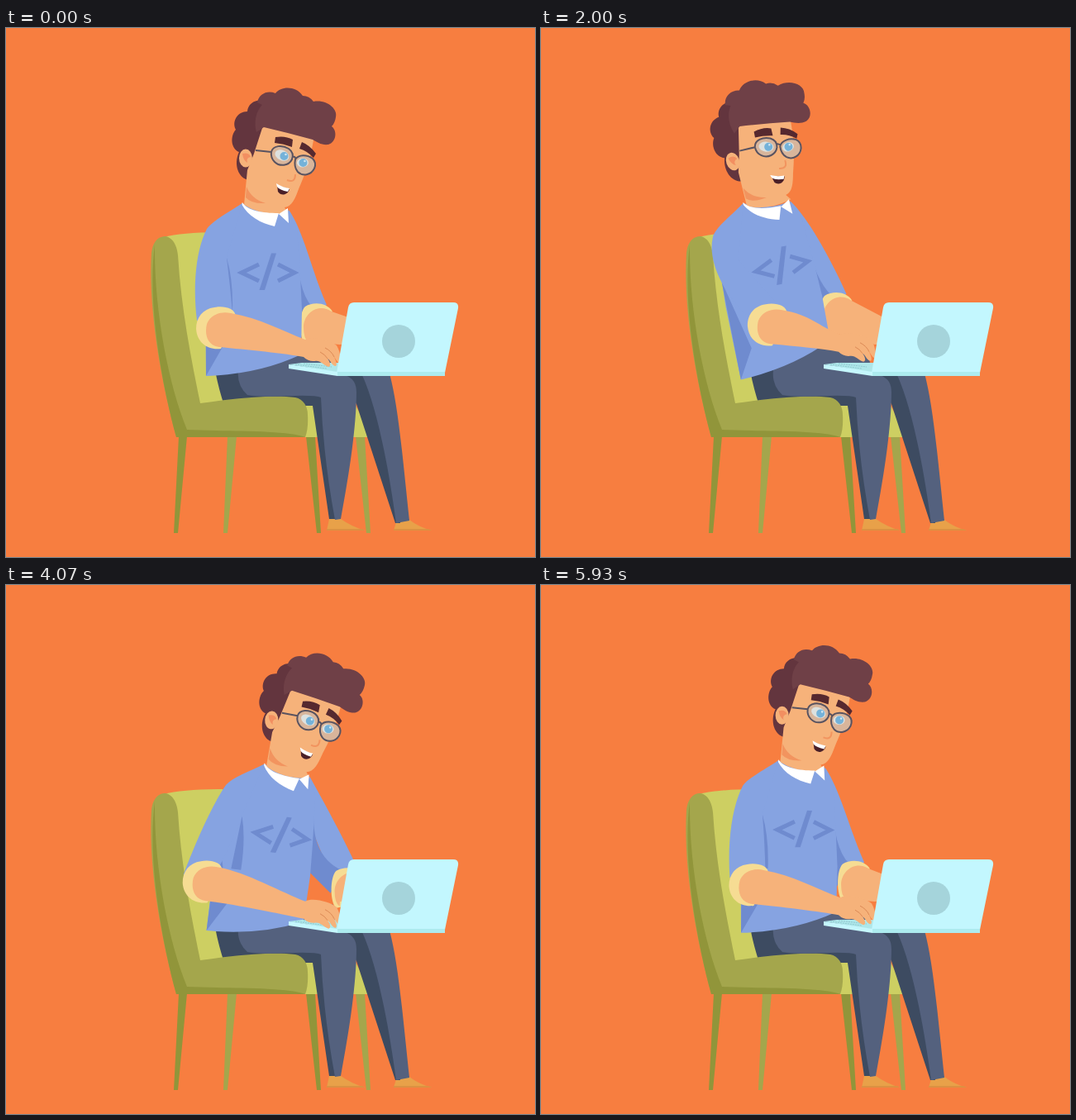
Write an HTML page that moves like this. It is 640 by 640 pixels and loops after 6000 ms.

```html
<!DOCTYPE html>
<html lang="en">
<head>
<meta charset="utf-8">
<title>Coder at a laptop</title>
<style>
html, body { margin: 0; width: 100%; height: 100%; overflow: hidden; background: #f77e40; }
svg { display: block; width: 100vw; height: 100vh; }
.skin { fill: #f6b27a; }
.blue { fill: #86a3e1; }
.shade { fill: #6f8bcf; }
.cuff { fill: #f6dc93; }
.olive { fill: #a4a64c; }
.moss { fill: #91953a; }
.lime { fill: #cdcf62; }
.navy { fill: #3d4b61; }
.slate { fill: #54617e; }
.white { fill: #fff; }
.line { fill: none; }
</style>
</head>
<body>
<svg viewBox="0 0 640 640">
  <!-- chair, legs and shoes -->
  <path class="olive" d="M268 494H279L268 611H263ZM423 494H434L441 611H436Z"/>
  <path class="moss" d="M209 494H219L208 611H203ZM363 494H374L381 611H376Z"/>
  <path class="lime" d="M190 253Q215 247 262 247L300 300V456H234ZM355 455H422Q433 474 438 495H355Z"/>
  <path fill="#e8a149" d="M391 594H405Q418 603 434 608H388ZM472 598L488 595Q500 604 515 608H469Z"/>
  <path fill="#dc9142" d="M388 606H431L434 608H388ZM469 606H511L515 608H469Z"/>
  <path class="navy" d="M405 418H440L477 599H471L424 455Z"/>
  <path class="slate" d="M430 418H464C474 455 479 510 488 596L472 599C464 540 450 460 430 418Z"/>
  <path class="navy" d="M254 419L300 408L384 446L400 594H391L371 457H264Q257 435 254 419Z"/>
  <path class="olive" d="M176 272C178 256 186 252 193 252C203 254 207 265 208 275C212 340 224 400 235 454C270 449 320 443 350 447C360 449 365 458 365 468Q366 485 362 495H206C187 425 172 340 176 272Z"/>
  <path class="moss" d="M180 262C179 340 196 430 219 486C260 488 340 486 362 495H206C187 425 171 330 180 262Z"/>
  <path class="slate" d="M281 414C295 406 315 390 335 386H395L400 418Q424 420 424 440C424 485 414 545 405 594L398 595Q384 520 381 447Q375 444 345 445Q310 447 292 444Q279 432 281 414Z"/>

  <!-- far arm -->
  <path class="blue" data-d="M t342,220 C t360,245 f370,295 f388,335 L f358,350 L t340,260 Z"/>
  <path class="shade" data-d="M t352,243 Q t350,315 f370,337 L f355,364 L t350,330 Z"/>
  <path class="cuff" data-d="M f395,343 C f388,332 f372,331 f362,337 C f354,344 f354,376 f362,382 L f372,380 L f375,345 Z"/>
  <path class="skin" data-d="M f394,343 C f378,332 f360,345 f360,362 Q f360,376 f366,380 L 404,383 L 414,382 L 414,350 Z"/>

  <g class="torso">
    <path class="blue" d="M286 212L245 243L241 330L242 421Q306 419 357 395L358 340L356 300L352 243Q350 235 341 220Q318 228 286 212Z"/>
    <path class="shade" d="M242 300L262 386L242 421ZM267 278Q275 305 274 343L262 343Z"/>
    <path class="line" d="M306 286L285 296L306 306M329 286L349 296L329 306" stroke="#6f8bcf" stroke-width="5"/>
    <path class="shade" d="M321 272.500H327L313 317H306.500Z"/>
  </g>

  <g id="head">
    <path fill="#63353e" d="M318 90C305 84 293 90 292 101C280 101 273 113 278 123C271 131 272 146 282 150C275 165 281 182 294 184L304 150L320 122Z"/>
    <path class="skin" d="M312 115L300 152L292 172L288 214Q310 228 341 224L337 217C346 216 350 206 354 195C361 179 368 162 373 130Z"/>
    <path fill="#f2945f" d="M291 192Q297 207 314 212Q297 213 290 205Z"/>
    <ellipse class="skin" cx="290" cy="157.500" rx="8" ry="11"/>
    <path fill="#f28f61" d="M286 152Q294 150 296 156Q290 157 292 163Q287 160 286 152Z"/>
    <path fill="#6f4047" d="M303 126C299 110 305 98 310 93L304 90C306 80 316 75 326 79C333 70 351 70 359 82Q367 82 372 89C388 86 402 98 399 108Q398 115 394 119C401 124 400 138 390 141C382 142 376 138 371 135Q342 127 312 120Z"/>
    <path fill="#56292f" d="M326 132Q338 130 347 135L346 144Q336 140 325 139ZM355 146L358 138Q368 142 375 152L372 157Q365 149 355 146Z"/>
    <g fill="#d8b59b">
      <ellipse cx="334" cy="154.500" rx="13" ry="11.500" transform="rotate(20 334 154.500)"/>
      <ellipse cx="362" cy="166" rx="12.500" ry="11.500" transform="rotate(20 362 166)"/>
    </g>
    <g fill="#dde1df">
      <ellipse cx="334" cy="154" rx="9" ry="6" transform="rotate(25 334 154)"/>
      <ellipse cx="359" cy="163" rx="7" ry="5.500"/>
    </g>
    <g fill="#74b2d9"><circle cx="336.500" cy="155" r="5"/><circle cx="359.500" cy="163" r="5"/></g>
    <g fill="#cfe6f2"><circle cx="338.500" cy="153" r="1.300"/><circle cx="361.500" cy="161" r="1.300"/></g>
    <path class="line" stroke="#595360" stroke-width="2" d="M321 150C323 142 334 141 342 146Q349 151 346 159C342 167 331 168 325 162Q320 157 321 150ZM350 159C354 153 364 153 371 158Q376 163 373 170C369 178 359 180 353 174Q348 168 350 159ZM346 155Q349 155 351 158M302 148L321 150"/>
    <path class="line" d="M350 177Q350 188 340 184" stroke="#f2945f" stroke-width="2"/>
    <path fill="#4a2028" d="M328 190L343 195C341 202 333 204 329 198Z"/>
    <path class="white" d="M327 188Q335 193 343 194L341 198Q331 196 328 192Z"/>
  </g>

  <path class="torso white" d="M286 211C292 221 310 224 330 224L325 240C308 236 293 228 285 213ZM330 225L341 218L342 236Z"/>

  <!-- laptop base -->
  <path fill="#aee7ea" d="M342 407L358 405H404L401 417Z"/>
  <path fill="#c5f7fd" d="M342 407L401 416V421L342 412Z"/>
  <path class="line" d="M350 407L388 412M360 406L394 410" stroke="#8fc9d0" stroke-dasharray="2 1"/>

  <!-- near arm -->
  <path class="blue" data-d="M t286,212 C t268,224 t250,233 t243,243 C t229,270 m226,315 e231,354 L e255,362 L e274,345 Q m271,310 t267,278 Z"/>
  <path class="cuff" data-d="M e278,350 C e278,338 e262,336 e252,338 C e238,340 e230,350 e230,364 C e231,380 e243,390 e260,388 Z"/>
  <path class="skin" data-d="M e272,345 C e307,351 h335,367 h362,377 C h372,372 h392,378 h400,384 C h404,391 h406,400 h404,405 C h401,406 h399,400 h397,398 C h400,404 h401,409 h398,409 C h394,408 h392,401 h389,400 C h392,404 h394,409 h390,410 C h384,408 h380,402 h374,403 Q h366,404 h360,398 C h340,394 e290,389 e258,386 C e243,384 e240,370 e243,358 C e247,347 e260,342 e272,345 Z"/>
  <path class="line" stroke="#dc8a56" data-d="M h386,387 Q h394,391 h397,398 M h380,392 Q h386,395 h389,400"/>

  <!-- laptop screen -->
  <path fill="#c3f7fe" d="M421 332H541Q548 332 547 339L531 417H400L414 338Q415 332 421 332Z"/>
  <path fill="#adebef" d="M401 416H531V421H401Z"/>
  <circle cx="475" cy="379" r="20" fill="#a5d4db"/>
</svg>
<script>
const LOOP = 6000, SWING = LOOP / 4;
const HIP = [265, 424], NECK = [305, 205], SHOULDER = [250, 262], UPPER_ARM = 103;

// Key points of the torso's lean: time in ms, degrees
const leans = [[0, 0], [790, -6.5], [2000, -11.1], [3000, -11.2], [3570, -1.6], [4150, 8], [4710, 5.3]];

const leanKey = i => {
  const n = leans.length, lap = Math.floor(i / n), [t, deg] = leans[i - lap * n];
  return [t + lap * LOOP, deg];
};

// Smooth cyclic curve through the key points
function leanAt(t) {
  const i = leans.findLastIndex(k => k[0] <= t);
  const [a, b, c, d] = [-1, 0, 1, 2].map(o => leanKey(i + o));
  const span = c[0] - b[0], u = (t - b[0]) / span;
  const slope = (p, q) => (q[1] - p[1]) / (q[0] - p[0]) * span;
  const ease = u * u * (3 - 2 * u);
  return b[1] + (c[1] - b[1]) * ease
    + slope(a, c) * u * (1 - u) ** 2 - slope(b, d) * u * u * (1 - u);
}

const rad = deg => deg * Math.PI / 180;

function turn(x, y, deg) {
  const c = Math.cos(rad(deg)), s = Math.sin(rad(deg)), dx = x - HIP[0], dy = y - HIP[1];
  return [HIP[0] + dx * c - dy * s, HIP[1] + dx * s + dy * c];
}

const torsoParts = document.querySelectorAll('.torso');
const head = document.getElementById('head');
const limbs = [...document.querySelectorAll('[data-d]')];

function draw(t) {
  const lean = leanAt(t), swing = 4 * Math.sin(2 * Math.PI * t / SWING);
  const nod = Math.min(0.6 * lean, 1.75 * lean);
  const arm = rad(swing - 2.35 * lean);

  const [sx, sy] = turn(...SHOULDER, lean);
  const ex = sx + UPPER_ARM * Math.sin(arm) - SHOULDER[0];
  const ey = (sy + UPPER_ARM * (Math.cos(arm) - 1) - SHOULDER[1]) / 2;
  const handY = lean / 4 - swing;
  const farX = Math.max(4.5 * lean, 1.3 * lean) - 1.2 * swing;

  // Path points are tagged by the part they follow:
  // torso, elbow, hand, far elbow, or midway along the near sleeve
  const follow = {
    t: (x, y) => turn(x, y, lean),
    e: (x, y) => [x + ex, y + ey],
    h: (x, y) => [x, y + handY],
    f: (x, y) => [x + farX, y + 1.2 * lean],
    m: (x, y) => {
      const [tx, ty] = turn(x, y, lean);
      return [tx * 0.65 + (x + ex) * 0.35, ty * 0.65 + (y + ey) * 0.35];
    }
  };
  for (const el of limbs) {
    el.setAttribute('d', el.dataset.d.replace(/([tehfm])(\d+),(\d+)/g,
      (_, part, x, y) => follow[part](+x, +y).map(n => n.toFixed(2)).join()));
  }
  const tilt = `rotate(${lean} ${HIP})`;
  torsoParts.forEach(el => el.setAttribute('transform', tilt));
  head.setAttribute('transform', `${tilt} rotate(${nod - lean} ${NECK})`);
}

function tick() {
  draw(performance.now() % LOOP);
  requestAnimationFrame(tick);
}
tick();
</script>
</body>
</html>
```
